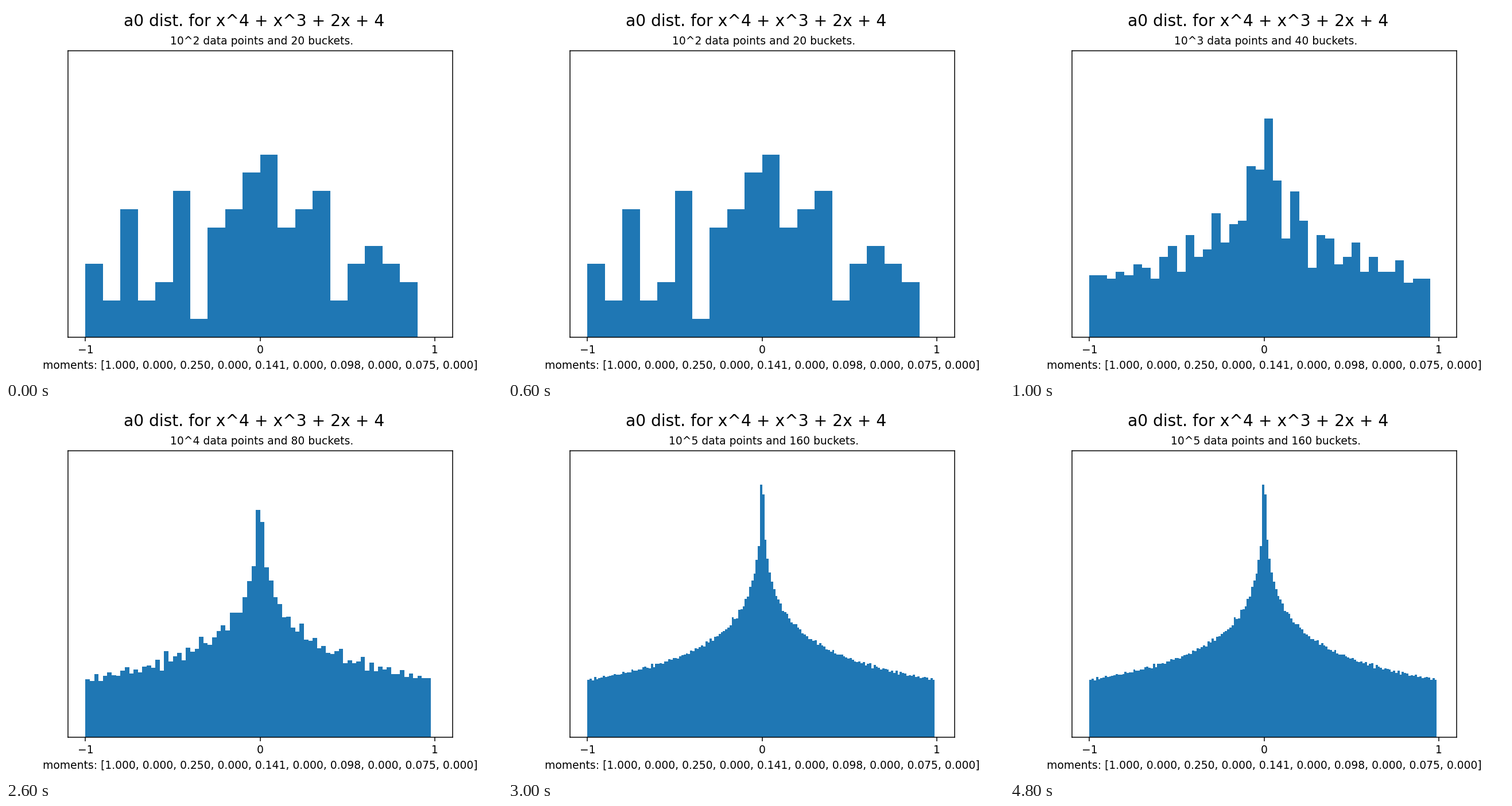
Write a matplotlib script that moves like this. It is 864x648 px and loops after 6 s.

```python
import numpy as np
import matplotlib.pyplot as plt
from matplotlib.animation import FuncAnimation

POLYNOMIAL = "x^4 + x^3 + 2x + 4"
LAST_STAGE = 3
FRAMES = 6  # the final stage is held for three seconds

plt.rcParams["font.family"] = "DejaVu Sans"

# Angles of the roots, from the real polynomial y^2 + y - 4 with y = 2 sqrt(2) cos(angle)
traces = (-1 + np.array([1, -1]) * np.sqrt(17)) / 2
angles = np.arccos(traces / np.sqrt(8))


def normalized_traces(count):
    n = np.arange(1, count + 1)
    return np.cos(np.outer(n, angles)).mean(axis=1)


def moment(k, samples=64):
    """k-th moment of the mean of two cosines with independent uniform angles."""
    c = np.cos(2 * np.pi * np.arange(samples) / samples)
    return abs((((c[:, None] + c) / 2) ** k).mean())


moments = ", ".join(f"{moment(k):.3f}" for k in range(10))

fig, ax = plt.subplots(figsize=(6.4, 4.8), dpi=135)
fig.suptitle(f"a0 dist. for {POLYNOMIAL}", fontsize=15)


def draw(frame):
    stage = min(frame, LAST_STAGE)
    buckets = 20 * 2**stage
    edges = np.linspace(-1, 1, buckets, endpoint=False)

    ax.clear()
    ax.hist(normalized_traces(10 ** (stage + 2)), bins=edges, density=True, color="#1f77b4")
    ax.set_xlim(-1.1, 1.1)
    ax.set_ylim(0, 1.6)
    ax.set_xticks([-1, 0, 1])
    ax.set_yticks([])
    ax.set_title(f" 10^{stage + 2} data points and {buckets} buckets.", fontsize=10)
    ax.set_xlabel(f"moments: [{moments}]")
    return ax.patches


animation = FuncAnimation(fig, draw, frames=FRAMES, interval=1000, repeat=True, repeat_delay=0)
plt.show()
```
